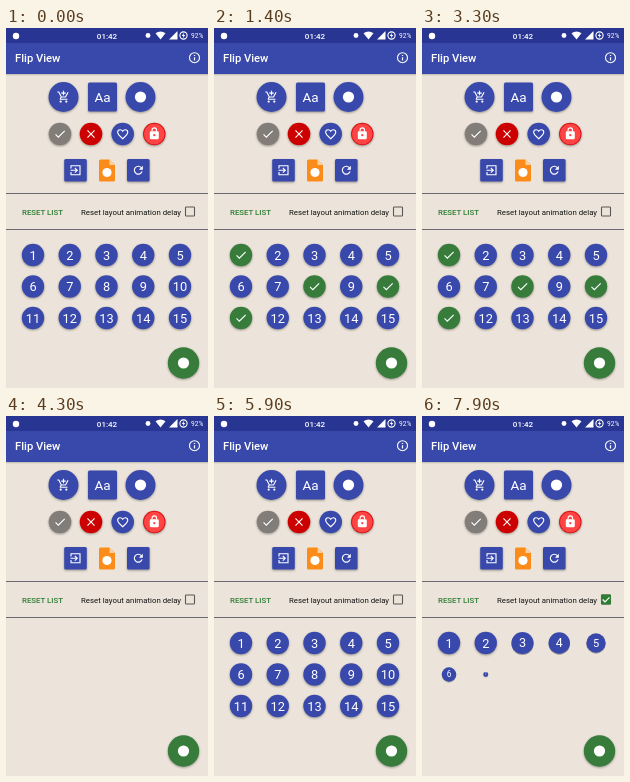
An HTML page that plays this animation: 202 by 360 pixels, repeating every 8000 ms.

```html
<!DOCTYPE html>
<html lang="en">
<head>
<meta charset="utf-8">
<title>Flip View</title>
<style>
  html, body { margin: 0; width: 100%; height: 100%; overflow: hidden; background: #ece4da; }
  svg { display: block; width: 100vw; height: 100vh; font-family: Roboto, sans-serif; }
  .raised { filter: drop-shadow(0 1px .8px rgba(0, 0, 0, .35)); }
  .mid { text-anchor: middle; }
</style>
</head>
<body>
<svg id="stage" viewBox="0 0 202 360">
  <defs>
    <linearGradient id="shade" x2="0" y2="1">
      <stop stop-opacity=".3"/><stop offset="1" stop-opacity="0"/>
    </linearGradient>
  </defs>
  <rect width="202" height="360" fill="#ece4da"/>
  <rect y="45" width="202" height="3" fill="url(#shade)"/>
  <rect width="202" height="46" fill="#3949ab"/>
  <rect width="202" height="15" fill="#283593"/>

  <g fill="#fff">
    <circle cx="10" cy="8" r="3.2"/>
    <text class="mid" x="101" y="10.6" font-size="8" font-weight="500">01:42</text>
    <circle cx="142" cy="7.5" r="2.4"/>
    <path d="M149.5 5.2Q154.5 1.6 159.5 5.2L154.5 11.5Z"/>
    <path d="M163 11.5H171.500V3Z"/>
    <circle cx="177.500" cy="7.5" r="3.6" fill="none" stroke="#fff" stroke-width="1.1"/>
    <path d="M178 4.8L175.800 8H177.300L177 10.200L179.200 7H177.700Z"/>
    <text x="185" y="10" font-size="6.6">92%</text>
    <text x="9" y="34.2" font-size="11.2" font-weight="500">Flip View</text>
    <circle cx="188.500" cy="29.700" r="5" fill="none" stroke="#fff" stroke-width="1.1"/>
    <path d="M187.900 29.200h1.200v3.300h-1.200zM187.900 26.900h1.200v1.200h-1.200z"/>
  </g>

  <g id="buttons"></g>

  <path d="M0 165.500H202M0 201.500H202" stroke="#6a6870"/>
  <text x="16" y="186.500" font-size="7.85" font-weight="500" fill="#2e7d32">RESET LIST</text>
  <text x="75" y="186.500" font-size="7.85" fill="#111">Reset layout animation delay</text>
  <rect x="179.500" y="179" width="9" height="9" rx=".8" fill="none" stroke="#5b5754" stroke-width="1.1"/>
  <g id="tick">
    <rect x="179" y="178.500" width="10" height="10" rx="1" fill="#2e7d32"/>
    <path d="M180.700 183.500L183 185.900L187.500 181.300" fill="none" stroke="#fff" stroke-width="1.200"/>
  </g>

  <g id="grid"></g>

  <circle class="raised" cx="177.500" cy="335" r="15.700" fill="#387c3c"/>
  <circle cx="177.500" cy="335" r="5.600" fill="#fff"/>
</svg>
<script>
const $ = id => document.getElementById(id);
const INDIGO = '#3949ab', GREEN = '#387c3c';

const line = d => `<path d="${d}" fill="none" stroke="#fff" stroke-width="2"/>`;
const solid = d => `<path d="${d}" fill="#fff" fill-rule="evenodd"/>`;
const icons = {
  cart: solid('M11 9h2V6h3V4h-3V1h-2v3H8v2h3z') +
    line('M1 3h2.700l4.400 9h7.500l4.500-8.300M8 12l-1.900 3.400q-.2 .6 .8 .6H19') +
    '<circle cx="7" cy="20" r="2" fill="#fff"/><circle cx="17" cy="20" r="2" fill="#fff"/>',
  done: line('M4 12.700L9 17.600L20.300 6.300'),
  close: line('M5.700 5.700L18.300 18.300M18.300 5.700L5.700 18.300'),
  heart: line('M12 20C5 14 3 11.500 3 8.500C3 6 5 4 7.500 4C9.200 4 11 5 12 6.500C13 5 14.800 4 16.500 4C19 4 21 6 21 8.500C21 11.500 19 14 12 20Z'),
  lock: solid('M6 8H18Q20 8 20 10V20Q20 22 18 22H6Q4 22 4 20V10Q4 8 6 8ZM12 13a2 2 0 0 0 0 4a2 2 0 0 0 0-4Z') +
    line('M8 8V6a4 4 0 0 1 8 0V8'),
  exit: line('M4 9V4H20V20H4V15M3 12H15M10.800 7.700L15.100 12L10.800 16.300'),
  refresh: line('M17.500 7.500A7 7 0 1 0 18.700 14') + solid('M20 4V11H13Z')
};

const icon = (name, x, y, size) =>
  `<g transform="translate(${x - size / 2} ${y - size / 2}) scale(${size / 24})">${icons[name]}</g>`;
const disc = (x, y, r, fill) => `<circle class="raised" cx="${x}" cy="${y}" r="${r}" fill="${fill}"/>`;
const tile = (x, y, w) =>
  `<rect class="raised" x="${x - w / 2}" y="${y - w / 2}" width="${w}" height="${w}" rx="1.500" fill="${INDIGO}"/>`;
const dot = (x, y, r) => `<circle cx="${x}" cy="${y}" r="${r}" fill="#fff"/>`;

$('buttons').innerHTML =
  disc(57.5, 69, 15, INDIGO) + icon('cart', 57.5, 69, 13.5) +
  tile(96.5, 69, 29) + '<text class="mid" x="96.500" y="73.800" font-size="13.500" fill="#fff">Aa</text>' +
  disc(134.5, 69, 15, INDIGO) + dot(134.5, 69, 5.6) +
  disc(54, 106, 11.3, '#827d79') + icon('done', 54, 106, 13.5) +
  disc(85, 106, 11.3, '#cc0000') + icon('close', 85, 106, 13.5) +
  disc(116.7, 106, 11.3, INDIGO) + icon('heart', 116.7, 106.3, 13.5) +
  disc(148.3, 106, 11.3, '#d81818') + '<circle cx="148.300" cy="106" r="10.300" fill="#ff4444"/>' +
  icon('lock', 148.3, 105.5, 13.5) +
  tile(69.5, 142.3, 22.6) + icon('exit', 69.5, 142.3, 13.5) +
  '<path d="M94.500 131.500H103.500L109 137V152Q109 153.500 107.500 153.500H94.500Q93 153.500 93 152V133Q93 131.500 94.500 131.500Z" fill="#fb8c1a"/>' +
  '<path d="M103.500 131.500V137H109Z" fill="#fdd0a0"/>' + dot(101, 144.5, 4.6) +
  tile(132.3, 142.3, 22.6) + icon('refresh', 132.3, 142.3, 13.5);

$('grid').innerHTML = Array.from({ length: 15 }, (_, i) => `<g>
  <g>${disc(0, 0, 11.2, INDIGO)}<text class="mid" y="4.500" font-size="12.800" fill="#fff">${i + 1}</text></g>
  <g>${disc(0, 0, 11.2, GREEN)}<g>${icon('done', 0, 0, 13.5)}</g></g>
</g>`).join('');
const cells = [...$('grid').children];

const LOOP = 8000, FLIP = 300, GROW = 250, STAGGER = 35;
const taps = { 0: 150, 7: 400, 9: 650, 10: 900 };
const resets = [{ clear: 3700, grow: 5113 }, { clear: 7200, grow: 7678 }];
const CHECK = 6500;
const clamp = v => Math.min(1, Math.max(0, v));

function draw(t) {
  const reset = resets.filter(r => t >= r.clear).pop();
  cells.forEach((cell, i) => {
    const grown = reset ? 1 - (1 - clamp((t - reset.grow - i * STAGGER) / GROW)) ** 5 : 1;
    const flip = !reset && i in taps ? clamp((t - taps[i]) / FLIP) : 0;
    const [front, back] = cell.children;
    const x = 27 + i % 5 * 36.75, y = 227 + Math.floor(i / 5) * 31.5;
    cell.style.display = grown > 0 ? '' : 'none';
    cell.setAttribute('transform',
      `translate(${x} ${y}) scale(${grown * Math.abs(Math.cos(flip * Math.PI))} ${grown})`);
    front.style.display = flip < .5 ? '' : 'none';
    back.style.display = flip < .5 ? 'none' : '';
    back.lastElementChild.setAttribute('transform', `scale(${clamp(flip * 2 - 1)})`);
  });
  $('tick').style.display = t >= CHECK ? '' : 'none';
}

const step = t => Math.max(0, Math.floor((t - 100) / 200) * 200 + 100);
const start = performance.now();
function tick() {
  draw(step((performance.now() - start) % LOOP));
  requestAnimationFrame(tick);
}
tick();
</script>
</body>
</html>
```
